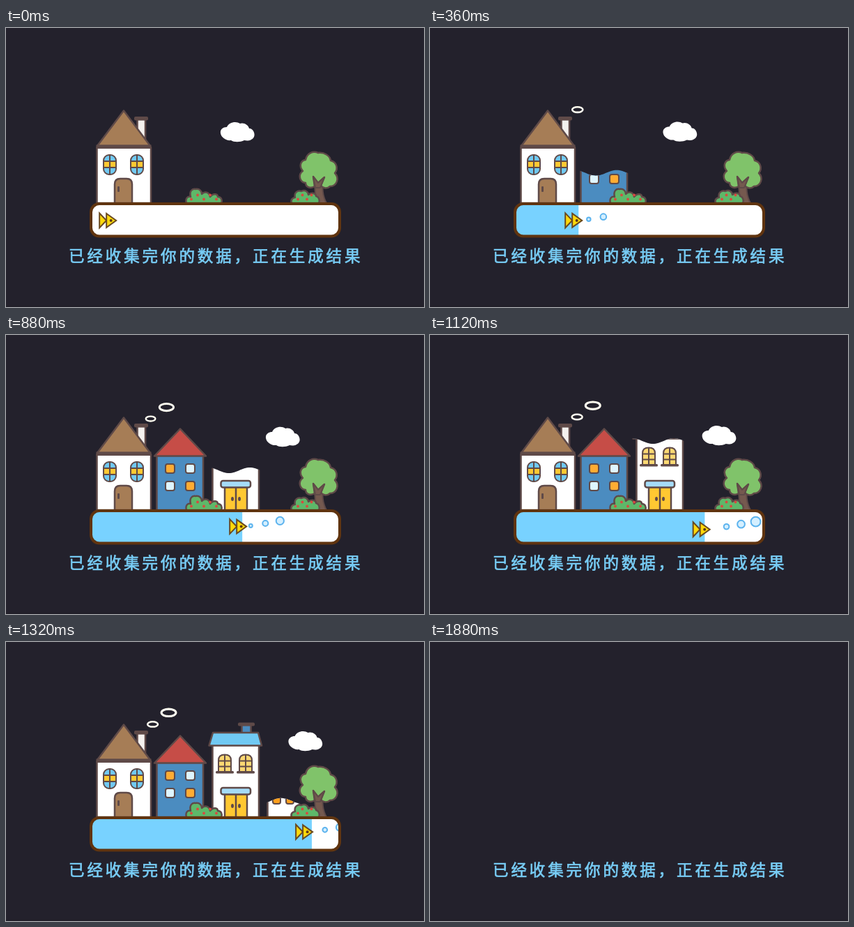
These frames come from a looping animation (600x400 px, 1.92 s). An HTML page:

```html
<!DOCTYPE html>
<html lang="zh">
<head>
<meta charset="utf-8">
<title>正在生成结果</title>
<style>
  html, body { margin: 0; width: 100%; height: 100%; overflow: hidden; background: #23212c; }
  svg { display: block; width: 600px; height: 400px; }
  .ink { stroke: #5f4a48; stroke-width: 2.5; stroke-linejoin: round; }
  .thin { stroke: #5f4a48; stroke-width: 2; stroke-linejoin: round; }
  .dark { fill: #5f4a48; }
  .smoke { fill: none; stroke: #fffdf0; }
  text {
    font: 400 22.5px "Noto Sans CJK SC", "Noto Sans CJK", sans-serif; letter-spacing: 3.9px;
    fill: #78cdf6; stroke: #78cdf6; stroke-width: 0.7;
  }
</style>
</head>
<body>
<svg viewBox="0 0 600 400">
  <defs>
    <clipPath id="inner"><rect x="123" y="253" width="354" height="44" rx="9"/></clipPath>
    <clipPath id="wave0"><path/></clipPath>
    <clipPath id="wave1"><path/></clipPath>
    <clipPath id="wave2"><path/></clipPath>
    <g id="pane">
      <rect x="1" y="1" width="18" height="28" rx="8" fill="#70c9f3" class="thin"/>
      <path d="M1 10H19V19H1Z" fill="#ffc832" class="thin"/>
      <path d="M10 1V29" class="thin"/>
    </g>
    <g id="arch">
      <path d="M1 26V9Q1 1 10 1T19 9V26Z" fill="#fcd872" class="thin"/>
      <path d="M10 1V26M1 10H19M1 18H19" fill="none" class="thin"/>
      <rect x="-3" y="24.5" width="26" height="3.5" rx="1.5" class="dark"/>
    </g>
    <rect id="square" width="13" height="13" rx="3" class="thin"/>
  </defs>

  <rect width="600" height="400" fill="#23212c"/>
  <rect y="398" width="600" height="2" fill="#201e28"/>

  <g id="scene">
    <path id="cloud" fill="#fff" d="M-24 2C-25-4-20-7-15-7C-12-14-2-16 4-12C9-14 16-10 17-5C23-5 26 3 24 7C21 13 14 13 10 12C4 15-5 15-9 12C-16 13-23 8-24 2Z"/>

    <ellipse class="smoke"/>
    <ellipse class="smoke"/>

    <!-- white house -->
    <rect x="188.5" y="131" width="11.5" height="38" fill="#f4f1ee" class="ink"/>
    <rect x="184" y="127" width="20" height="5.5" rx="2" class="dark"/>
    <rect x="130.5" y="171" width="77.5" height="80" fill="#fff" class="ink"/>
    <path d="M169 118.5L131 169H207Z" fill="#a67d56" class="ink"/>
    <rect x="129.5" y="167.5" width="79" height="5.5" class="dark"/>
    <use href="#pane" x="139" y="181"/>
    <use href="#pane" x="178" y="181"/>
    <path d="M156 251V224Q156 216 164 216H173Q181 216 181 224V251Z" fill="#a67d56" class="ink"/>
    <rect x="160" y="227" width="3" height="8" rx="1" class="dark"/>

    <!-- blue house -->
    <g clip-path="url(#wave0)">
      <rect x="216.5" y="173" width="66.5" height="78" fill="#4b8cc0" class="ink"/>
      <path d="M250 134.500L213 173.500H287Z" fill="#c64d47" class="ink"/>
      <use href="#square" x="229" y="185" fill="#ffac33"/>
      <use href="#square" x="258" y="185" fill="#dff5ff"/>
      <use href="#square" x="229" y="210" fill="#dff5ff"/>
      <use href="#square" x="258" y="210" fill="#ffac33"/>
    </g>

    <!-- shop -->
    <g clip-path="url(#wave1)">
      <rect x="338.5" y="119" width="13" height="13" fill="#4b8cc0" class="ink"/>
      <rect x="333" y="115.5" width="24" height="5" rx="2" class="dark"/>
      <rect x="296.5" y="148" width="66.5" height="103" fill="#fff" class="ink"/>
      <path d="M297 130H362L367 148.5H291.5Z" fill="#70c9f3" class="ink"/>
      <use href="#arch" x="304" y="160.5"/>
      <use href="#arch" x="334" y="160.5"/>
      <path d="M314 218H346V251H314ZM330 218V251" fill="#ffc832" class="ink"/>
      <ellipse cx="325" cy="235" rx="2" ry="3" class="dark"/>
      <ellipse cx="335" cy="235" rx="2" ry="3" class="dark"/>
      <rect x="308.5" y="209" width="42.5" height="9.5" rx="3" fill="#a5dcf8" class="ink"/>
    </g>

    <!-- cottage -->
    <g clip-path="url(#wave2)">
      <rect x="375.5" y="199" width="45.5" height="52" fill="#fff" class="ink"/>
      <path d="M398 169L372 200H424Z" fill="#c64d47" class="ink"/>
      <rect x="383" y="214" width="11" height="18" rx="3" fill="#ff9f1c" class="thin"/>
      <rect x="402" y="214" width="11" height="18" rx="3" fill="#ff9f1c" class="thin"/>
    </g>

    <!-- plants -->
    <path d="M440 251C446 241 444 232 441 214L448 221L457 214C452 228 455 242 460 251Z" fill="#75594f" class="thin"/>
    <path d="M430 189C432 179 441 176 448 179C457 178 465 183 466 190C475 192 477 202 472 208C479 215 475 227 465 227C461 231 455 230 452 226L457 214L448 222L441 213L443 227C437 231 430 228 430 222C421 221 419 210 426 205C420 198 423 190 430 189Z" fill="#80c36a" class="ink"/>
    <path d="M441 213L448 222L457 214L451 229H444Z" fill="#75594f" class="thin"/>
    <g id="shrubs">
      <path d="M259 251C257 244 261 241 265 242C263 234 267 230 272 231C278 230 281 234 281 238C286 233 292 236 293 242C298 236 304 238 304 242C309 242 311 247 309 251Z" fill="#5eb869" class="ink"/>
      <path d="M410 251C408 246 412 243 415 243C413 236 419 232 424 234C430 231 434 236 434 239C439 235 445 237 445 241C449 242 451 247 449 251Z" fill="#5eb869" class="ink"/>
    </g>

    <rect x="122" y="252" width="357" height="46" rx="12" fill="#fff"/>
    <g clip-path="url(#inner)">
      <rect id="fill" x="121" y="252" height="46" fill="#78d2ff"/>
      <g id="bubbles" fill="#d4efff" stroke="#5cb3ee" stroke-width="2"></g>
    </g>
    <rect x="122" y="252" width="357" height="46.5" rx="12" fill="none" stroke="#60340f" stroke-width="4"/>
    <g id="fish" fill="#ffd90a" stroke="#6a4a20" stroke-width="2">
      <path d="M0-10.5L10 0L0 10.5Z"/>
      <path d="M10-10L24 0L10 10Z"/>
      <circle cx="16.5" cy="0" r="2" fill="#5f3a18" stroke="none"/>
    </g>
  </g>

  <text x="90" y="335.3">已经收集完你的数据，正在生成结果</text>
</svg>

<script>
  const LOOP = 1920, STEP = 40, DONE = 1520, GROUND = 255;
  const { sin, cos, sqrt, min, max, floor, PI } = Math;
  const $ = s => document.querySelector(s);
  const set = (el, attrs) => { for (const k in attrs) el.setAttribute(k, attrs[k]); };
  const add = (parent, tag, attrs = {}) => {
    const el = document.createElementNS("http://www.w3.org/2000/svg", tag);
    set(el, attrs);
    return parent.appendChild(el);
  };

  // Houses appear behind a rising wavy edge; rush is the acceleration
  const waves = [
    { left: 208, right: 292, crest: 268, born: 40, speed: 0.148, rush: 0 },
    { left: 286, right: 372, crest: 350, born: 420, speed: 0.105, rush: 0.00006 },
    { left: 368, right: 428, crest: 395, born: 1180, speed: 0.18, rush: 0.0001 }
  ];
  const rings = [
    { born: 80, reach: 1, rate: 0.0014 },
    { born: 560, reach: 0.37, rate: 0.0025 }
  ];
  const ringEls = document.querySelectorAll(".smoke");
  const bubbles = Array.from({ length: 6 }, () => add($("#bubbles"), "circle"));

  function berries(x, gap, count) {
    for (let i = 0; i < count; i++)
      add($("#shrubs"), "circle", { cx: x + i * gap, cy: 245.5 - i % 2 * 6, r: 1.9, fill: "#d84a40" });
  }
  berries(266, 9, 5);
  berries(419, 6.5, 4);

  function wavePath(w, t) {
    const age = max(0, t - w.born);
    const level = GROUND - w.speed * age - w.rush * age * age;
    let d = `M${w.left} 260`;
    for (let x = w.left; x <= w.right; x += 2)
      d += `L${x} ${level - 4 * cos((x - w.crest) * PI / 30)}`;
    return d + `L${w.right} 260Z`;
  }

  function drawRing(el, ring, t) {
    const rise = max(0, ring.reach * sin((t - ring.born) * ring.rate));
    const r = 3 + 7.5 * sqrt(rise);
    set(el, {
      cx: 198 + 36 * rise, cy: 127 - 26 * rise, rx: r, ry: r * 0.5,
      "stroke-width": 1 + r * 0.2,
      display: t > ring.born ? "inline" : "none"
    });
  }

  function draw(time) {
    const t = min(time, DONE);
    const blink = time > DONE && (time - DONE) / STEP % 2 === 1;
    set($("#scene"), { visibility: blink ? "hidden" : "visible" });

    set($("#cloud"), { transform: `translate(${332 + t * 0.0739} ${149 - 4e-6 * t * t})` });
    waves.forEach((w, i) => set($(`#wave${i} path`), { d: wavePath(w, t) }));
    rings.forEach((ring, i) => drawRing(ringEls[i], ring, t));
    set($("#fill"), { width: 0.262 * t - 16e-6 * t * t });

    const x = 287 + 170 * sin((t - 745) * 0.0015);
    const y = 276 + 4.5 * t / DONE * sin((t - 370) * 2 * PI / 560);
    set($("#fish"), { transform: `translate(${x} ${y})` });

    bubbles.forEach((b, i) => {
      const d = 4 + t * 0.074 - 21 * i;
      set(b, {
        cx: x + 24 + d, cy: y - d * 0.17, r: 2 + max(0, d) * 0.075,
        display: d > 5 && d < 66 ? "inline" : "none"
      });
    });
  }

  const start = performance.now();
  function tick() {
    const time = (performance.now() - start) % LOOP;
    draw(floor(time / STEP) * STEP);
    requestAnimationFrame(tick);
  }
  tick();
</script>
</body>
</html>
```
